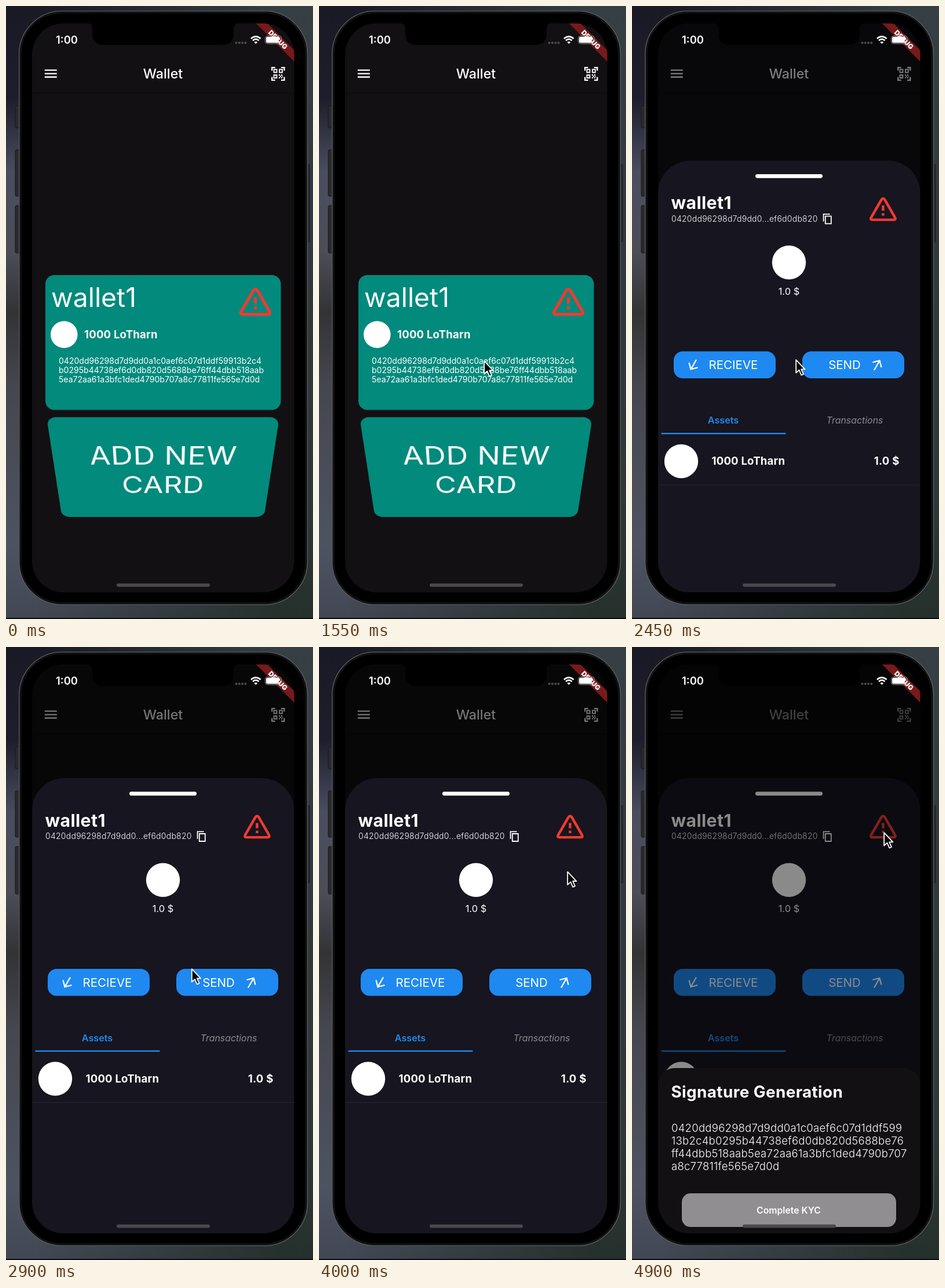
Animation of 530x1057 px, one loop 5.05 s. Source, as an HTML page:

```html
<!DOCTYPE html>
<html lang="en">
<head>
<meta charset="utf-8">
<title>Wallet</title>
<style>
  html, body { margin: 0; width: 100%; height: 100%; overflow: hidden; background: #1b1c27; }
  #stage { position: relative; width: 530px; height: 1057px; overflow: hidden; }
  svg { position: absolute; left: 0; top: 0; }
  svg, #add { font-family: Inter, Roboto, sans-serif; }
  text { fill: #fff; white-space: pre; }
  .bold { font-weight: 700; letter-spacing: .4px; }
  .light { font-weight: 300; letter-spacing: .24px; }
  .mid { text-anchor: middle; }
  .hash { font-size: 14.06px; }
  .amount { font-size: 18.56px; font-weight: 700; letter-spacing: .2px; }
  .action { font-size: 20.5px; }
  .line { fill: none; stroke: #fff; stroke-width: 2.3; }
  .thin { stroke-width: 1.8; }
  .alert { fill: none; stroke: #f23a30; stroke-width: 5.2; stroke-linejoin: round; }
  #add {
    position: absolute; left: 68px; top: 709px; width: 406px; height: 232px;
    box-sizing: border-box; padding-top: 48px; border-radius: 16px;
    background: #028a7c; color: #fff; font-size: 56px; line-height: 68px; text-align: center;
    letter-spacing: .6px; transform-origin: 50% 0;
    transform: matrix3d(.99,0,0,0, 0,.854,0,.000655, 0,0,1,0, 0,0,0,1);
  }
</style>
</head>
<body>
<div id="stage">
  <svg width="530" height="1057" viewBox="0 0 530 1057">
    <defs>
      <linearGradient id="wallLeft" x2="0" y2="1">
        <stop stop-color="#191a26"/><stop offset=".15" stop-color="#1d1e2b"/>
        <stop offset=".27" stop-color="#494d60"/><stop offset=".4" stop-color="#4b4e57"/>
        <stop offset=".5" stop-color="#333336"/><stop offset=".62" stop-color="#45474f"/>
        <stop offset=".88" stop-color="#4d5362"/><stop offset="1" stop-color="#414753"/>
      </linearGradient>
      <linearGradient id="wallRight" x2="0" y2="1">
        <stop stop-color="#364044"/><stop offset=".4" stop-color="#303a3e"/>
        <stop offset=".8" stop-color="#2e3838"/><stop offset="1" stop-color="#25302c"/>
      </linearGradient>
      <linearGradient id="fade"><stop offset=".1" stop-color="#000"/><stop offset=".9" stop-color="#fff"/></linearGradient>
      <mask id="fadeRight"><rect width="530" height="1057" fill="url(#fade)"/></mask>
      <clipPath id="screen"><rect x="45" y="30" width="452.5" height="981" rx="54"/></clipPath>
      <g id="alert">
        <path class="alert" d="M426.8 491Q430.5 485.500 434.200 491L455 527Q457 531.500 452.500 531.500H408.500Q404 531.500 406 527Z"/>
        <path d="M427.900 502.500h5.200v10.500h-5.200zM427.900 518h5.200v5.200h-5.200z" fill="#f23a30"/>
      </g>
    </defs>

    <rect width="530" height="1057" fill="url(#wallLeft)"/>
    <rect width="530" height="1057" fill="url(#wallRight)" mask="url(#fadeRight)"/>
    <rect y="1055" width="530" height="2" fill="#0c0d11"/>
    <g fill="#2a2a2e" stroke="#17171a">
      <rect x="16" y="172" width="10" height="38" rx="2"/>
      <rect x="16" y="248" width="10" height="80" rx="2"/>
      <rect x="16" y="344" width="10" height="82" rx="2"/>
      <rect x="515" y="273" width="9" height="134" rx="2"/>
    </g>
    <rect x="22.8" y="8.8" width="497.6" height="1023.4" rx="74" fill="#000" stroke="#58585b" stroke-width="1.6"/>
    <rect x="25.5" y="11.5" width="492" height="1018" rx="71" fill="#000" stroke="#161618" stroke-width="2"/>

    <g clip-path="url(#screen)">
      <rect x="45" y="30" width="453" height="981" fill="#121013"/>
      <path d="M45 150.5H498" stroke="#0c0b0d" stroke-width="2"/>
      <path class="line" d="M66.8 110.7h21M66.8 116.6h21M66.8 122.5h21"/>
      <text class="mid" x="271" y="124.7" font-size="23.2" font-weight="500">Wallet</text>
      <g class="line">
        <path d="M459.2 111.5v-5.3h5.4M475 106.2h5.4v5.3M480.4 122.5v5.3h-5.4M464.6 127.8h-5.4v-5.3"/>
        <path class="thin" d="M462.5 109.5h5v5h-5zM472 109.5h5v5h-5zM462.5 119h5v5h-5z"/>
        <path stroke-dasharray="2 2" d="M471 119h7M473 121.3h5M471 123.6h7"/>
      </g>

      <rect x="68" y="464" width="406.5" height="232.5" rx="15.5" fill="#028a7c"/>
      <text x="78" y="518.5" font-size="46.2">wallet1</text>
      <use href="#alert"/>
      <circle cx="100.3" cy="566.5" r="23.3" fill="#fff"/>
      <text class="amount" x="135" y="572.8">1000 LoTharn</text>
      <g class="hash">
        <text x="91" y="616.5">0420dd96298d7d9dd0a1c0aef6c07d1ddf59913b2c4</text>
        <text x="91" y="633">b0295b44738ef6d0db820d5688be76ff44dbb518aab</text>
        <text x="91" y="649.3">5ea72aa61a3bfc1ded4790b707a8c77811fe565e7d0d</text>
      </g>
    </g>
  </svg>

  <div id="add">ADD NEW<br>CARD</div>

  <svg width="530" height="1057" viewBox="0 0 530 1057">
    <g clip-path="url(#screen)">
      <rect id="shade1" x="45" y="30" width="453" height="981" opacity="0"/>
      <g id="sheet1">
        <rect x="45" y="226" width="452.5" height="900" rx="56" fill="#17151f"/>
        <rect x="213" y="249.5" width="116" height="6.7" rx="3.3" fill="#fff"/>
        <text class="bold" x="67.5" y="310" font-size="30.2">wallet1</text>
        <text class="hash light" x="68" y="331.3">0420dd96298d7d9dd0...ef6d0db820</text>
        <path class="line thin" d="M330.6 331v-12.6h11M333.8 322h10v13h-10z"/>
        <use href="#alert" transform="translate(69.7 -121) scale(.845)"/>
        <circle cx="271" cy="401.8" r="29.2" fill="#fff"/>
        <text class="mid" x="271" y="457.3" font-size="16.5">1.0 $</text>

        <rect x="72" y="555" width="176" height="46.5" rx="15.5" fill="#1f89f2"/>
        <rect x="294" y="555" width="176" height="46.5" rx="15.5" fill="#1f89f2"/>
        <text class="action mid" x="175" y="586">RECIEVE</text>
        <text class="action mid" x="367" y="586">SEND</text>
        <path class="line" d="M111 569.5L101.5 586M98.5 574.5L101.5 586L113.5 583"/>
        <path class="line" d="M418 587.5L427.500 571M415.500 574L427.500 571L430.500 582.500"/>

        <text class="mid" x="157.5" y="680" font-size="16.2" font-weight="600" style="fill:#2089ee">Assets</text>
        <text class="mid" x="384.5" y="680" font-size="15.9" font-style="italic" style="fill:#8a898d">Transactions</text>
        <rect x="50.5" y="695.5" width="215" height="2.4" fill="#2089ee"/>
        <circle cx="85" cy="744.5" r="29.2" fill="#fff"/>
        <text class="amount" x="137.5" y="751">1000 LoTharn</text>
        <text class="amount" x="461.5" y="751" text-anchor="end">1.0 $</text>
        <rect x="45" y="785" width="453" height="1" fill="#282731"/>
      </g>

      <rect id="shade2" x="45" y="30" width="453" height="981" opacity="0"/>
      <g id="sheet2">
        <rect x="45" y="726" width="452.5" height="700" rx="29" fill="#121013"/>
        <text class="bold" x="67.5" y="776.7" font-size="27.84">Signature Generation</text>
        <g class="light" font-size="18.56">
          <text x="68" y="836">0420dd96298d7d9dd0a1c0aef6c07d1ddf599</text>
          <text x="68" y="858">13b2c4b0295b44738ef6d0db820d5688be76</text>
          <text x="68" y="880">ff44dbb518aab5ea72aa61a3bfc1ded4790b707</text>
          <text x="68" y="902">a8c77811fe565e7d0d</text>
        </g>
        <rect x="86" y="942" width="370" height="58" rx="15" fill="#918e92"/>
        <text class="mid" x="270.5" y="976.5" font-size="15.8" font-weight="600">Complete KYC</text>
      </g>

      <path d="M140 29h262q-9 1-9 11v7q0 20-20 20H169q-20 0-20-20v-7q0-10-9-11z"/>
      <g transform="translate(497.5 30) rotate(45)">
        <rect x="-60" y="32.5" width="120" height="14" fill="#78191b"/>
        <text class="mid" y="43.8" font-size="11.8" font-weight="900">DEBUG</text>
      </g>
      <text class="mid" x="105" y="65.2" font-size="18.4" font-weight="600">1:00</text>
      <g fill="#4c4b4f">
        <circle cx="397.5" cy="63.5" r="2"/><circle cx="402.8" cy="63.5" r="2"/>
        <circle cx="408.1" cy="63.5" r="2"/><circle cx="413.4" cy="63.5" r="2"/>
      </g>
      <g class="line" style="stroke-width:2.7">
        <path d="M423 56.2q8.2-7.2 16.6 0M426 59.5q5.3-4.6 10.6 0"/>
        <path d="M428.3 62.3q3-2.3 6 0l-3 3z" fill="#fff" stroke="none"/>
      </g>
      <rect x="447.5" y="51.5" width="28" height="13.5" rx="4" fill="none" stroke="#99898b"/>
      <rect x="449" y="53" width="22" height="10.5" rx="2.5" fill="#fff"/>
      <rect x="191" y="995.8" width="161" height="5.6" rx="2.8" fill="#4b494d"/>
    </g>
    <path id="cursor" d="M1.2 2.2V24.5L6.5 19.7L10.3 28.5L14 26.9L10.2 18.3H16.5Z"
      fill="#050506" stroke="#fff" stroke-width="1.8" stroke-linejoin="round"/>
  </svg>
</div>
<script>
  const LOOP = 5050, STEP = 50, LAST = 4900, SLIDE = 213.4;
  const byId = id => document.getElementById(id);
  const clamp = v => Math.min(1, Math.max(0, v));
  const smooth = v => v * v * (3 - 2 * v);
  const move = (id, x, y) => byId(id).setAttribute('transform', `translate(${x} ${y})`);

  function bezier(x1, y1, x2, y2) {
    const at = (a, b, s) => 3 * a * s * (1 - s) ** 2 + 3 * b * s * s * (1 - s) + s ** 3;
    return x => {
      let lo = 0, hi = 1;
      for (let i = 0; i < 24; i++) {
        const s = (lo + hi) / 2;
        if (at(x1, x2, s) < x) lo = s; else hi = s;
      }
      return at(y1, y2, hi);
    };
  }
  const slideEase = bezier(0, 0, .2, 1);
  const shadeEase = bezier(.25, .1, .25, 1);

  // time, x, y
  const pointer = [
    [250, 532, 850], [700, 284, 610], [1700, 284, 610], [2100, 282, 608],
    [2650, 282, 608], [3400, 427, 396], [3850, 427, 396], [4500, 434, 318], [LOOP, 434, 318]
  ];

  function pointerAt(t) {
    if (t <= pointer[0][0]) return pointer[0].slice(1);
    const i = pointer.findIndex(p => p[0] >= t);
    const [t0, x0, y0] = pointer[i - 1], [t1, x1, y1] = pointer[i];
    const k = smooth((t - t0) / (t1 - t0));
    return [x0 + (x1 - x0) * k, y0 + (y1 - y0) * k];
  }

  function sheet(n, t, start, height, rest) {
    const k = clamp((t - start) / SLIDE);
    move('sheet' + n, 0, rest + height * (1 - (k ? slideEase(k) : 0)));
    byId('shade' + n).setAttribute('opacity', k ? .54 * shadeEase(k) : 0);
  }

  function draw(now) {
    const t = Math.min(LAST, Math.floor((now % LOOP) / STEP) * STEP);
    sheet(1, t, 2300, 785, 0);
    sheet(2, t, 4782, 326, -40.7);
    move('cursor', ...pointerAt(t));
  }

  const begin = performance.now();
  function tick() {
    draw(performance.now() - begin);
    requestAnimationFrame(tick);
  }
  tick();
</script>
</body>
</html>
```
